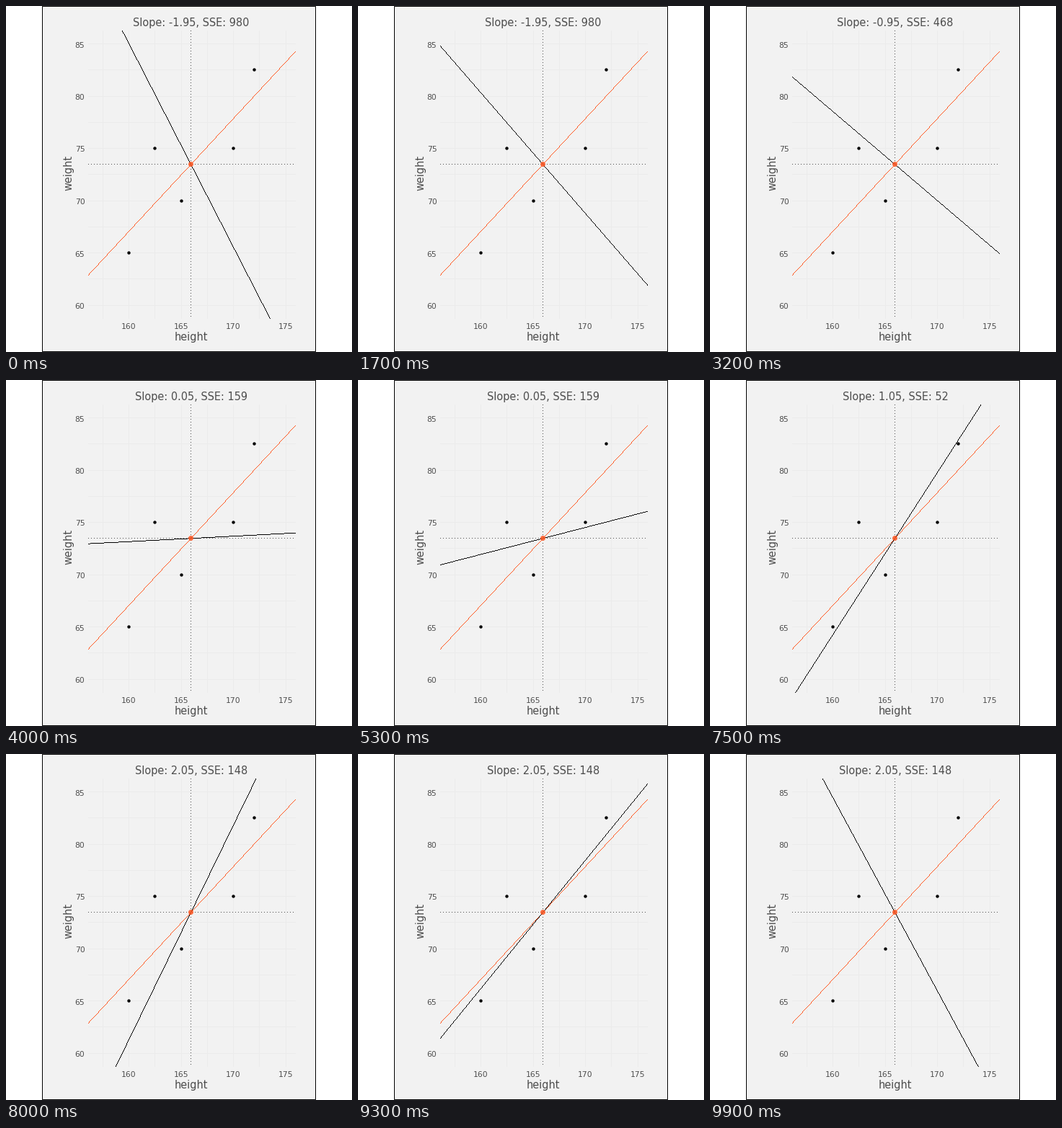
Write a matplotlib script that moves like this. It is 480 px wide and 480 px high and loops after 10 s.

```python
import numpy as np
import matplotlib.pyplot as plt
from matplotlib.animation import FuncAnimation
from matplotlib.patches import Circle, Rectangle

plt.rcParams["font.family"] = "DejaVu Sans"
plt.rcParams["path.simplify"] = False

SIZE, DPI = 480, 72            # one point equals one pixel
SCALE = 14.5                   # pixels per data unit on both axes
LEFT, RIGHT, TOP, BOTTOM = 114, 402, 34, 434
BG, GRID, INK, ORANGE = "#f2f2f2", "#ebebeb", "#4d4d4d", "#ff5722"

HEIGHT = np.array([160, 162.5, 165, 170, 172])
WEIGHT = np.array([65, 75, 70, 75, 82.5])
MX, MY = HEIGHT.mean(), WEIGHT.mean()
DX, DY = HEIGHT - MX, WEIGHT - MY
BEST = (DX @ DY) / (DX @ DX)

SLOPES = -1.948 + np.arange(5)
HOLD, MOVE = 10, 10            # frames per rest and per move
STEP = HOLD + MOVE


def px(x):
    return 170.5 + SCALE * (x - 160)


def py(y):
    return 342.5 - SCALE * (y - 65)


def mid(v):
    """Centre of the pixel that holds v."""
    return np.floor(v) + 0.5


fig = plt.figure(figsize=(SIZE / DPI, SIZE / DPI), dpi=DPI, facecolor="white")
ax = fig.add_axes([0, 0, 1, 1])
ax.set_xlim(0, SIZE)
ax.set_ylim(SIZE, 0)
ax.axis("off")

ax.add_patch(Rectangle((50.5, 0.5), 379, 479, fc=BG, ec="black", lw=1,
                       zorder=0, snap=False))
panel = Rectangle((LEFT, TOP), RIGHT - LEFT, BOTTOM - TOP, transform=ax.transData)


def segment(xs, ys, color, z, **kw):
    line, = ax.plot(xs, ys, color=color, zorder=z, lw=1, snap=False,
                    solid_capstyle="butt", dash_capstyle="butt", **kw)
    line.set_clip_path(panel)
    return line


def vline(x, color, z, **kw):
    segment([mid(px(x))] * 2, [TOP, BOTTOM], color, z, **kw)


def hline(y, color, z, **kw):
    segment([LEFT, RIGHT], [mid(py(y))] * 2, color, z, **kw)


def set_slope(line, b):
    """Trace the line pixel by pixel, without smoothing."""
    if abs(b) <= 1:
        cols = np.arange(LEFT, RIGHT)
        rows = np.floor(py(MY) - b * (cols - px(MX)) + 0.5)
    else:
        rows = np.arange(TOP, BOTTOM)
        cols = np.floor(px(MX) - (rows - py(MY)) / b + 0.5)
    gap = np.full(len(cols), np.nan)
    xs = np.column_stack([cols, cols + 1, gap]).ravel()
    ys = np.column_stack([rows + 0.5, rows + 0.5, gap]).ravel()
    line.set_data(xs, ys)


def dot(x, y, r, color, **kw):
    ax.add_patch(Circle((mid(px(x)), mid(py(y))), r, color=color, lw=0,
                        zorder=5, **kw))


def label(x, y, text, size, **kw):
    return ax.text(x, y, text, fontsize=size, color=INK, zorder=6, **kw)


for x in np.arange(157.5, 176, 2.5):
    vline(x, GRID, 1)
for y in np.arange(60, 86, 2.5):
    hline(y, GRID, 1)

dots = dict(linestyle=(0, (1, 3)))
vline(MX, INK, 2, **dots)
hline(MY, INK, 2, **dots)

set_slope(segment([], [], ORANGE, 3), BEST)
fit = segment([], [], "black", 4)

for x, y in zip(HEIGHT, WEIGHT):
    dot(x, y, 2.2, "black")
dot(MX, MY, 3.5, ORANGE, alpha=0.85)

for x in range(160, 176, 5):
    label(px(x), 448, str(x), 10.8, ha="center")
for y in range(60, 86, 5):
    label(109.5, py(y) + 5, str(y), 10.8, ha="right")
label(257, 464, "height", 14.5, ha="center")
label(87, 231, "weight", 14.5, ha="center", va="center", rotation=90)
title = label(257, 28, "", 14.5, ha="center")


def draw(frame):
    state, k = divmod(frame, STEP)
    t = max(0, k - HOLD) / MOVE
    ease = (1 - np.cos(np.pi * t)) / 2
    start, end = SLOPES[state], SLOPES[(state + 1) % len(SLOPES)]
    set_slope(fit, start + (end - start) * ease)
    sse = np.sum((DY - start * DX) ** 2)
    title.set_text(f"Slope: {start:.2f}, SSE: {sse:.0f}")
    return fit, title


anim = FuncAnimation(fig, draw, frames=STEP * len(SLOPES), interval=100,
                     repeat=True, repeat_delay=0)
plt.show()
```
